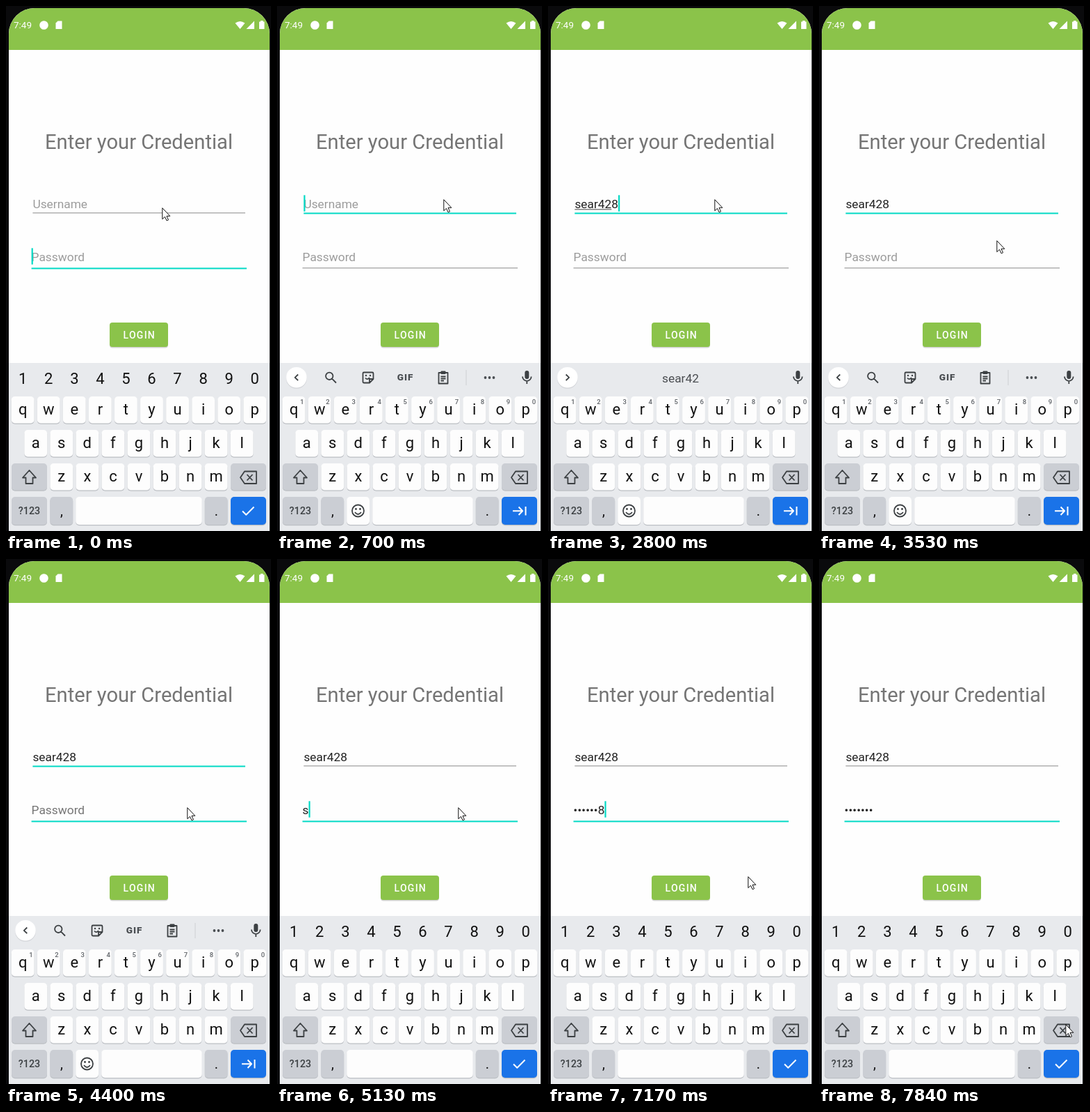
These frames come from a looping animation (381x753 px, 7990 ms). An HTML page:

```html
<!DOCTYPE html>
<html lang="en">
<head>
<meta charset="utf-8">
<title>Login form</title>
<style>
html, body { margin: 0; height: 100%; overflow: hidden; background: #0a0a0c; }
svg { display: block; width: 100vw; height: 100vh; font-family: Roboto, sans-serif; }
.icon { fill: none; stroke: #3c4043; stroke-width: 1.8; stroke-linejoin: round; }
.white { stroke: #fff; stroke-width: 2; }
</style>
</head>
<body>
<svg id="stage" viewBox="0 0 381 753"></svg>
<script>
const GREEN = '#8bc34a', TEAL = '#03dac5', GREY = '#9c9c9c', FIELD = 17.34;
const NAME = 'sear428', LOOP = 7990;
const stage = document.getElementById('stage');

const rect = (x, y, w, h, fill, r = 0) =>
  `<rect x="${x}" y="${y}" width="${w}" height="${h}" rx="${r}" fill="${fill}"/>`;
const circle = (x, y, r, fill) => `<circle cx="${x}" cy="${y}" r="${r}" fill="${fill}"/>`;
const text = (x, y, s, size, fill = '#111', attrs = 'text-anchor="middle"') =>
  `<text x="${x}" y="${y}" font-size="${size}" fill="${fill}" ${attrs}>${s}</text>`;
const icon = (d, cls = '') => `<path class="icon ${cls}" d="${d}"/>`;
const solid = (d, fill) => `<path d="${d}" fill="${fill}"/>`;
const key = (x, y, w, fill = '#fdfdfd', h = 38.5) =>
  rect(x, y + 1.2, w, h, '#bcbfc4', 5) + rect(x, y, w, h, fill, 5);

const keyRow = (letters, x, y) => [...letters].map((c, i) =>
  key(x - 16.4 + i * 37.06, y, 32.8) + text(x + i * 37.06, y + 26, c, 22)).join('');

const frame = rect(4, 3, 375, 800, '#fefefe', 37) +
  solid('M4 63V40A37 37 0 0 1 41 3H342A37 37 0 0 1 379 40V63Z', GREEN) +
  text(11, 32, '7:49', 13.5, '#fff', '') +
  circle(54.5, 27.5, 6.3, '#fff') +
  solid('M74.5 21.5H80.5V33H71.5V24.5Z', '#fff') +
  solid('M329.5 24.5Q336.5 19.5 343.5 24.5L336.5 33Z', '#fff') +
  solid('M357 21.5V33H345.5Z', '#fff') +
  solid('M364 22.5H366V21H369.5V22.5H371.5V33H364Z', '#fff') +
  text(191, 204.5, 'Enter your Credential', 29.2, '#757575') +
  rect(149, 456, 84, 34.5, '#d4d4d4', 4) + rect(149, 454, 84, 35, GREEN, 4) +
  text(191.8, 477, 'LOGIN', 14, '#fff', 'text-anchor="middle" font-weight="500" letter-spacing="1.25"');

const keys = rect(4, 512, 375, 241, '#e8eaed') +
  keyRow('qwertyuiop', 24.2, 560) + keyRow('asdfghjkl', 42.7, 608) + keyRow('zxcvbnm', 79.8, 656) +
  key(8, 656, 51, '#cbced4') + key(323, 656, 51, '#cbced4') +
  icon('M33.5 666L43 676.5H38.5V685H28.5V676.5H24Z') +
  icon('M343 667.5H360V685H343L337 676.3ZM346.5 672L354.5 680.5M354.5 672L346.5 680.5') +
  key(8, 704, 51, '#cbced4', 40) + text(33.5, 729, '?123', 14.3, '#3c4043', 'text-anchor="middle" font-weight="500"') +
  key(63.4, 704, 32.8, '#cbced4', 40) + text(80, 731, ',', 20) +
  key(285.8, 704, 32.8, '#cbced4', 40) + text(302.3, 731, '.', 20) +
  key(323, 704, 51, '#1a73e8', 40);

const numberKeys = [...'1234567890'].map((d, i) => text(24.2 + i * 37.06, 542, d, 22)).join('') +
  key(100.2, 704, 181.6, '#fdfdfd', 40) + icon('M340 724.5L345.3 729.8L356.5 718.5', 'white');

const letterKeys = [...'1234567890'].map((d, i) =>
    text(36 + i * 37.06, 570.5, d, 9.5, '#5f6368', 'text-anchor="middle" font-weight="500"')).join('') +
  key(100.2, 704, 32.8, '#fdfdfd', 40) + key(137.2, 704, 144.6, '#fdfdfd', 40) +
  icon('M125 724A8.5 8.5 0 1 1 108 724A8.5 8.5 0 1 1 125 724M112 726Q116.5 732 121 726') +
  circle(113.5, 721.5, 1.4, '#3c4043') + circle(119.5, 721.5, 1.4, '#3c4043') +
  icon('M339 724.3H352.5M347.5 718.5L353 724.3L347.5 730M357.5 718V730.5', 'white') +
  circle(28, 533.8, 15, '#d2d4d8') + circle(28, 532.8, 14.8, '#fff') +
  rect(356.3, 523, 6, 12, '#3c4043', 3) + icon('M353 531.5A6.3 6.3 0 0 0 365.6 531.5M359.3 538V542');

const divider = x => rect(x, 522, 1, 22, '#cdd0d4');
const tools = icon('M30.3 528.5L25.8 532.8L30.3 537') +
  icon('M80.5 530.8A5.2 5.2 0 1 1 70.1 530.8A5.2 5.2 0 1 1 80.5 530.8M79.2 534.7L85 540.5') +
  icon('M125 525.5H137Q138.5 525.5 138.5 527V535L133 540.5H125Q123.5 540.5 123.5 539V527Q123.5 525.5 125 525.5ZM138 535H133V540M127 533.5Q130 537 133 533') +
  circle(128, 530, 1.2, '#3c4043') + circle(134, 530, 1.2, '#3c4043') +
  text(184.5, 537.2, 'GIF', 13.5, '#4a4e52', 'text-anchor="middle" font-weight="900" letter-spacing=".9"') +
  icon('M232.5 526H245.5V541.5H232.5ZM235.5 531.5H242.5M235.5 534.5H242.5M235.5 537.5H240') +
  rect(235.5, 523.5, 7, 4.5, '#3c4043', 1) + divider(271.5) +
  [299.5, 305.5, 311.5].map(x => circle(x, 533, 1.9, '#4a4e52')).join('');

const suggestions = words => icon('M25.8 528.5L30.3 532.8L25.8 537') +
  (words.length > 1 ? divider(136) + divider(244.5) : '') +
  words.map((w, i) => text(words.length > 1 ? [88, 190, 293][i] : 190.5, 539.5, w, FIELD, '#4a4d51')).join('');

// Each entry changes part of the picture and holds until the next one.
const steps = [
  [0, { name: 0, under: 0, pass: 0, hidden: false, focus: 'p', pressed: '', caret: 'p', letters: false, words: null, mouse: [224, 289] }],
  [150, { mouse: [239, 277] }],
  [430, { focus: 'up', pressed: 'u', caret: '' }],
  [570, { focus: 'u', pressed: '', caret: 'u' }],
  [700, { letters: true }],
  [1020, { caret: '' }],
  [1320, { name: 1, caret: 'u' }],
  [1480, { name: 2, under: 1, words: ['s', 'is', 'so'] }],
  [1630, { name: 3, under: 2, words: ['se', 'see', 'set'] }],
  [1780, { name: 4, under: 3, words: ['sea', 'seas', 'sear'] }],
  [1930, { under: 4, words: ['sear', 'search', 'searching'] }],
  [2370, { name: 5 }],
  [2520, { under: 5, words: ['sear4'] }],
  [2660, { name: 6 }],
  [2800, { name: 7, under: 6, words: ['sear42'] }],
  [2950, { under: 0, words: null }],
  [3380, { caret: '', mouse: [244, 298] }],
  [3530, { mouse: [255, 336] }],
  [3680, { mouse: [260, 356] }],
  [3960, { caret: 'u' }],
  [4400, { focus: 'up', pressed: 'p', caret: '' }],
  [4540, { focus: 'p', pressed: '', caret: 'p' }],
  [4690, { letters: false }],
  [5130, { pass: 1 }],
  [5280, { pass: 2 }],
  [5560, { pass: 3 }],
  [5710, { pass: 4 }],
  [6150, { pass: 6 }],
  [6300, { pass: 7 }],
  [6740, { caret: '' }],
  [7020, { mouse: [268, 385] }],
  [7160, { caret: 'p', mouse: [287, 455] }],
  [7290, { mouse: [312, 570] }],
  [7430, { mouse: [335, 685] }],
  [7570, { mouse: [345, 728] }],
  [7700, { caret: '', mouse: [350, 705] }],
  [7840, { hidden: true, mouse: [354, 667] }]
];
let last = {};
const states = steps.map(([, change]) => last = { ...last, ...change });

function field(s, id, x, right, baseline, hint, value) {
  const on = s.focus.includes(id), y = baseline + 6.2;
  return rect(x, on ? y + .2 : y, right - x, on ? 2 : 1.2, on ? TEAL : GREY) +
    text(x, baseline, value || hint, FIELD, value ? '#222' : s.pressed === id ? '#757575' : GREY, `id="${id}"`);
}

function draw(s) {
  const shown = s.hidden || !s.pass ? '•'.repeat(s.pass) : '•'.repeat(s.pass - 1) + NAME[s.pass - 1];
  stage.innerHTML = frame +
    field(s, 'u', 38.4, 344, 290, 'Username', NAME.slice(0, s.name)) +
    field(s, 'p', 36.6, 346, 366, 'Password', shown).replace('y="372.', 'y="375.') +
    keys + (s.letters ? letterKeys + (s.words ? suggestions(s.words) : tools) : numberKeys) +
    '<g id="marks"></g>' +
    `<path transform="translate(${s.mouse[0] + .8} ${s.mouse[1] + .7})" d="M0 0V16L3.7 12.6L6.3 18.2L8.7 17.1L6.2 11.6H11Z" fill="#fff" stroke="#111"/>`;
  let marks = '';
  if (s.under) {
    const width = document.getElementById('u').getSubStringLength(0, s.under);
    marks += rect(38.4, 291.3, width, 1, '#444');
  }
  if (s.caret) {
    const isName = s.caret === 'u', filled = isName ? s.name : s.pass;
    const width = filled ? document.getElementById(s.caret).getComputedTextLength() : 0;
    marks += rect((isName ? 38.4 : 36.6) + width, isName ? 271.3 : 347.3, 2.2, 23.4, TEAL);
  }
  document.getElementById('marks').innerHTML = marks;
}

let current = -1;
const start = performance.now();
function tick() {
  const t = (performance.now() - start) % LOOP;
  const index = steps.findLastIndex(([at]) => at <= t);
  if (index !== current) draw(states[current = index]);
  requestAnimationFrame(tick);
}
tick();
</script>
</body>
</html>
```
